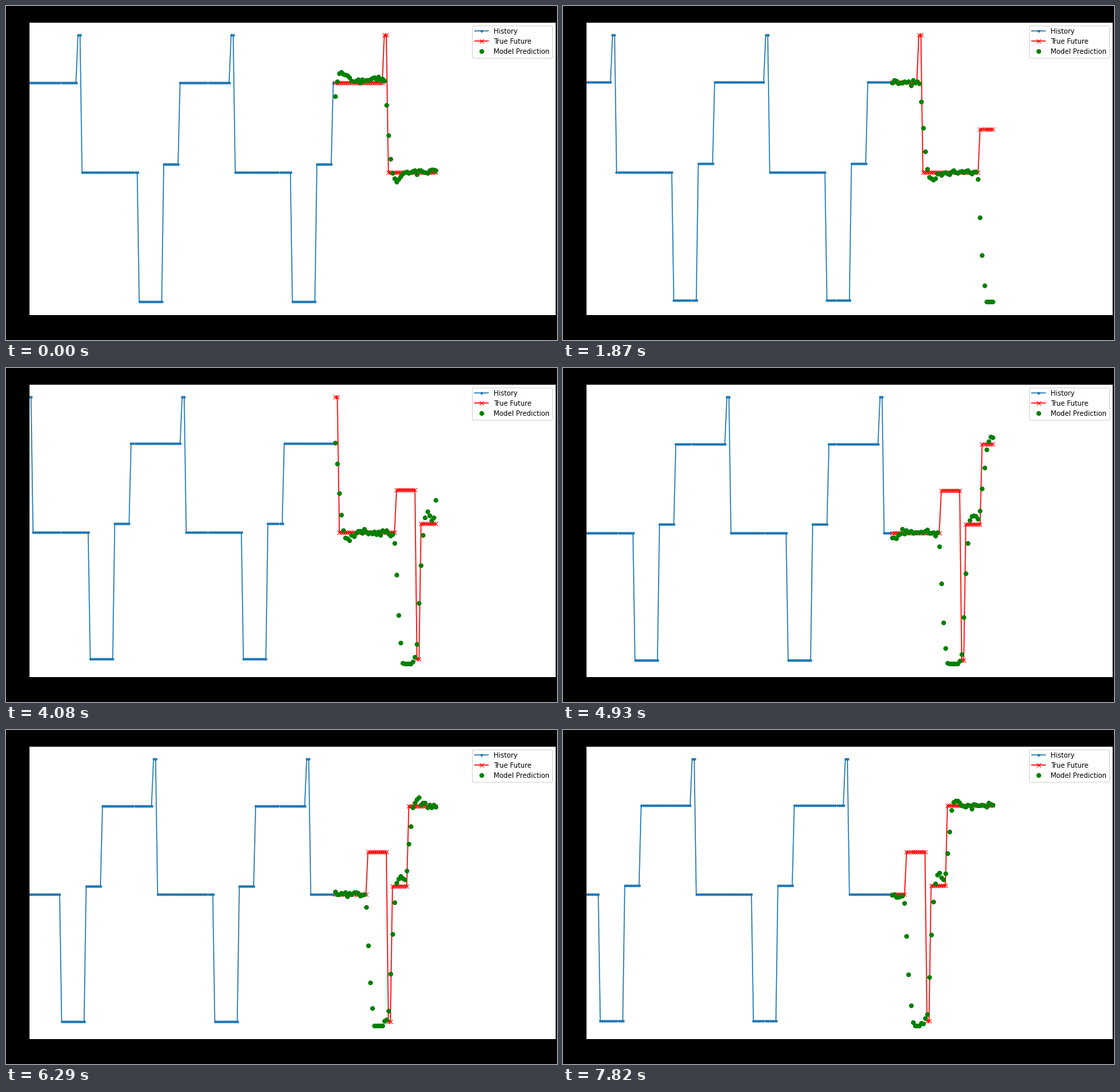
A matplotlib script that plays this animation: 817x496 px, repeating every 7.99 s.

```python
import numpy as np
import matplotlib.pyplot as plt
from matplotlib.animation import FuncAnimation

W, H, DPI = 817, 496, 72
FRAMES, STEP_MS = 47, 170
PAST, FUTURE = 150, 50
HIGH, MID, LOW, ODD = 0.8225, 0.5166, 0.4842, 0.6457

# One cycle, starting at sample 26: (level, samples)
CYCLE = [(LOW, 28), (0, 12), (MID, 8), (HIGH, 25), (1, 2)]
WAVE = np.concatenate([np.full(n, v) for v, n in CYCLE])


def signal(t):
    """Measured value, with one faulty stretch in the third cycle."""
    v = WAVE[(t - 26) % len(WAVE)]
    return np.where((t >= 204) & (t <= 213), ODD, v)


def response(k):
    """Damped step from 0 to 1 with a slight overshoot."""
    k = np.maximum(k, 0)
    return 1 - np.exp(-0.4 * k) * (np.cos(0.5 * k) + 0.8 * np.sin(0.5 * k))


def undershoot(shift):
    """How far the forecast dips below the lowest level; drifts slowly."""
    grow = np.clip((shift - 9) / 8, 0, 1)
    return grow * (0.0155 + 0.0025 * np.cos(2 * np.pi * (shift - 19) / 26))


def forecast(shift):
    """Smoothed steps that know neither the peak nor the fault."""
    rng = np.random.default_rng(shift)
    t = np.arange(FUTURE) + PAST + shift
    top = HIGH + 0.013 * np.exp(-shift / 2)
    steps = [(146.7, top), (173.7, LOW), (202.3, 0), (213.4, MID), (222, top)]
    level = MID
    v = level + rng.normal(0, 0.006, FUTURE)
    for start, goal in steps:
        v += (goal - level) * response(t - start - rng.normal(0, 0.12))
        level = goal
    return np.maximum(v, -undershoot(shift))


fig = plt.figure(figsize=(W / DPI, H / DPI), dpi=DPI, facecolor="black")
ax_w, ax_h, left, top_edge = 781.2, 434.88, 34.07, 23.65
ax = fig.add_axes([left / W, 1 - (top_edge + ax_h) / H, ax_w / W, ax_h / H])
ax.set_xlim(-PAST, 108)
ax.set_xticks([])
ax.set_yticks([])

behind, ahead = np.arange(-PAST, 0), np.arange(FUTURE)
history, = ax.plot(behind, np.zeros(PAST), ".-", label="History")
truth, = ax.plot(ahead, np.zeros(FUTURE), "rx-", label="True Future")
guess, = ax.plot(ahead, np.zeros(FUTURE), "go", label="Model Prediction")
ax.legend(loc="upper right")


def draw(frame):
    shift = frame + (frame >= 25)  # one sample is skipped midway
    v = signal(np.arange(PAST + FUTURE) + shift)
    p = forecast(shift)
    history.set_ydata(v[:PAST])
    truth.set_ydata(v[PAST:])
    guess.set_ydata(p)
    lo, hi = min(v.min(), p.min()), max(v.max(), p.max())
    pad = 0.05 * (hi - lo)
    ax.set_ylim(lo - pad, hi + pad)
    return history, truth, guess


anim = FuncAnimation(fig, draw, frames=FRAMES, interval=STEP_MS,
                     init_func=lambda: draw(0), repeat=True, repeat_delay=0)
plt.show()
```
